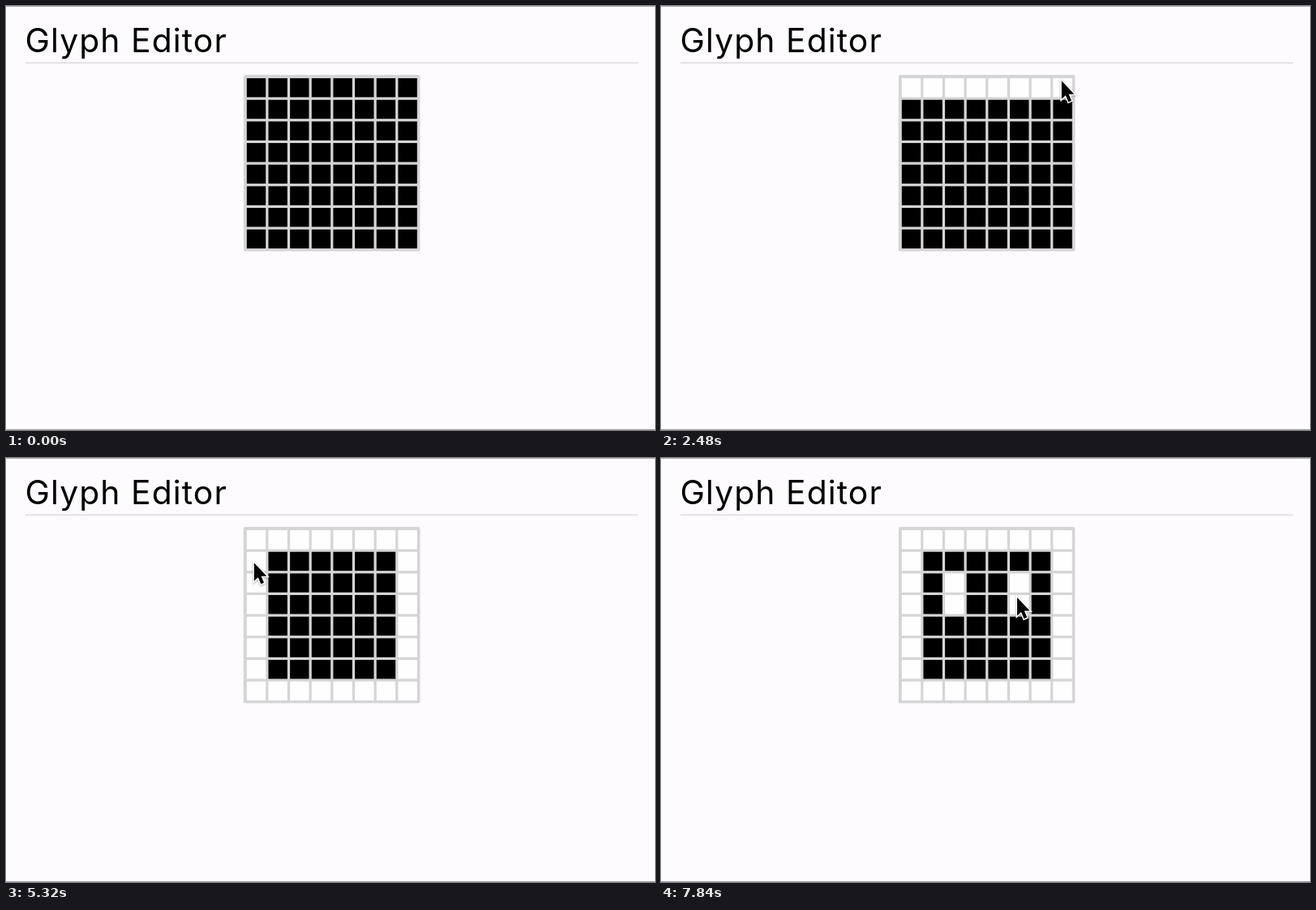
An HTML page for the animation above (8000 ms loop, 800 by 523 pixels).

```html
<!DOCTYPE html>
<html lang="en">
<head>
<meta charset="utf-8">
<title>Glyph Editor</title>
<style>
  html, body { margin: 0; width: 100%; height: 100%; overflow: hidden; background: #fdfbfe; }
  svg { display: block; width: 100vw; height: 100vh; }
  text { font: 400 40.8px Inter, "Open Sans", sans-serif; letter-spacing: 1.1px; }
  #cursor { filter: drop-shadow(0 1.5px 1.3px rgba(0, 0, 0, .35)); }
</style>
</head>
<body>
<svg viewBox="0 0 800 523">
  <rect width="800" height="523" fill="#fdfbfe"/>
  <rect width="800" height="1" fill="#b0aeb1"/>
  <rect y="522" width="800" height="1" fill="#a09ea1"/>
  <text x="23.5" y="57">Glyph Editor</text>
  <rect x="24" y="69" width="755" height="2.4" fill="#e6e4e7"/>
  <rect x="292.8" y="85" width="217.6" height="217.4" rx="2" fill="#d5d4d6"/>
  <g id="cells"></g>
  <path id="cursor" d="M.3 -1.3v22.6l5 -4.6l3.5 8.2l3.7 -1.6l-3.4 -8h6.8z"
        stroke="#fff" stroke-width="3" paint-order="stroke"/>
</svg>
<script>
const LOOP = 8000, SIZE = 8, PITCH = 26.65, CELL = 23.4, LEFT = 296.8, TOP = 89.1;
const GAP = (PITCH - CELL) / 2;

const ENTRY = { time: 280, x: 512, y: 506 };

// Pointer strokes; each starts where the previous one ended
const moves = [
  { from: 280, to: 800, x: 274.5, y: 92 },
  { from: 800, to: 1160, x: 310.5, y: 96 },
  { from: 1640, to: 2480, x: 493.5, y: 93.5 },
  { from: 2520, to: 3280, x: 502.6, y: 275 },
  { from: 3360, to: 4200, x: 322.2, y: 291 },
  { from: 4200, to: 5040, x: 307, y: 133.5 },
  { from: 5040, to: 5320, x: 305.5, y: 130.5 },
  { from: 5560, to: 5960, x: 360, y: 149.5 },
  { from: 6160, to: 6440, x: 362.5, y: 169.5 },
  { from: 6840, to: 7240, x: 438, y: 152.5 },
  { from: 7360, to: 7840, x: 438.7, y: 173.3 }
];

// Time spans in which the button is held down
const presses = [[1400, 5320], [5960, 6600], [7240, 7840]];

const clamp = u => Math.min(1, Math.max(0, u));
const ease = u => u * u * (3 - 2 * u);

function pointer(t) {
  let { x, y } = ENTRY;
  for (const move of moves) {
    const k = ease(clamp((t - move.from) / (move.to - move.from)));
    x += (move.x - x) * k;
    y += (move.y - y) * k;
  }
  return { x, y };
}

const group = document.getElementById("cells");
const cursor = document.getElementById("cursor");
const cells = Array.from({ length: SIZE * SIZE }, (_, i) => {
  const rect = document.createElementNS("http://www.w3.org/2000/svg", "rect");
  rect.setAttribute("x", LEFT + PITCH * (i % SIZE));
  rect.setAttribute("y", TOP + PITCH * Math.floor(i / SIZE));
  rect.setAttribute("width", CELL);
  rect.setAttribute("height", CELL);
  group.append(rect);
  return { rect, paintedAt: Infinity };
});

// A cell is painted when the pressed pointer first enters it
for (const [from, to] of presses) {
  for (let t = from; t <= to; t += 10) {
    const { x, y } = pointer(t);
    const col = Math.floor((x - LEFT + GAP) / PITCH);
    const row = Math.floor((y - TOP + GAP) / PITCH);
    const cell = cells[row * SIZE + col];
    cell.paintedAt = Math.min(cell.paintedAt, t);
  }
}

function draw(t) {
  for (const { rect, paintedAt } of cells) {
    rect.setAttribute("fill", t >= paintedAt ? "#fffeff" : "#000");
  }
  const { x, y } = pointer(t);
  cursor.setAttribute("transform", `translate(${x} ${y})`);
  cursor.setAttribute("visibility", t < ENTRY.time ? "hidden" : "visible");
}

const start = performance.now();
function tick() {
  draw((performance.now() - start) % LOOP);
  requestAnimationFrame(tick);
}
tick();
</script>
</body>
</html>
```
